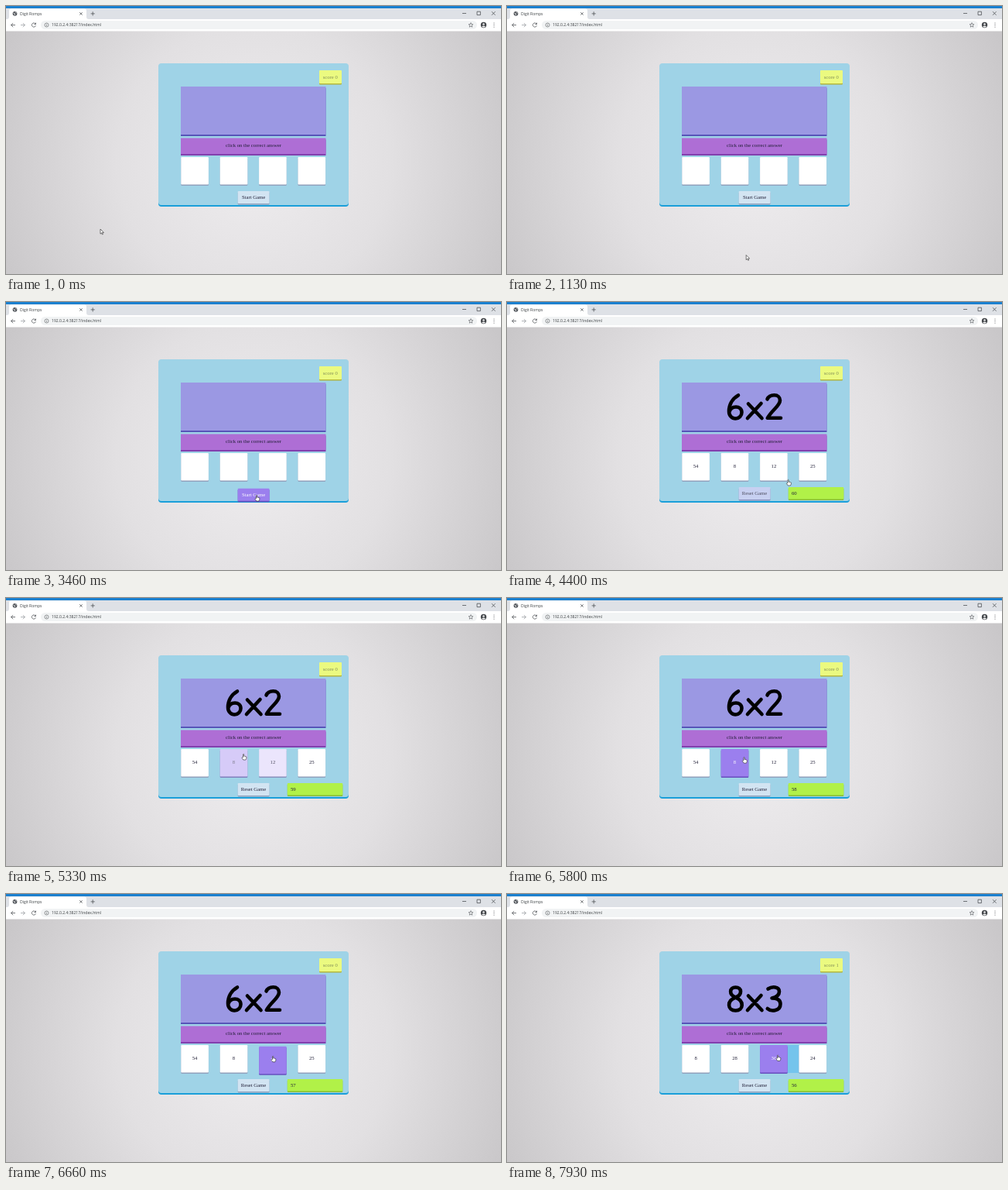
These frames come from a looping animation (640x346 px, 8 s). An HTML page:

```html
<!DOCTYPE html>
<html lang="en">
<head>
<meta charset="utf-8">
<title>Times table quiz</title>
<style>
  html, body { margin: 0; height: 100%; overflow: hidden; }
  svg { display: block; width: 100vw; height: 100vh; }
  text { font: 6.68px "Liberation Serif", Times, serif; fill: #222038; }
  .mid { text-anchor: middle; }
  .ui { font: 5.05px "Open Sans", "Noto Sans", sans-serif; fill: #3c4043; }
  .line { fill: none; stroke: #505357; stroke-width: .8; }
  .sum { fill: none; stroke: #000; stroke-width: 4.6; stroke-linecap: round; stroke-linejoin: round; }
  .pointer { fill: #fff; stroke: #222; stroke-width: .6; stroke-linejoin: round; }
</style>
</head>
<body>
<svg viewBox="0 0 640 346" preserveAspectRatio="none">
  <defs>
    <radialGradient id="page" gradientUnits="userSpaceOnUse" cx="320" cy="200" r="355">
      <stop offset="0" stop-color="#efedef"/>
      <stop offset=".5" stop-color="#e2e0e2"/>
      <stop offset="1" stop-color="#c9c7c9"/>
    </radialGradient>
  </defs>
  <rect width="640" height="346" fill="url(#page)"/>

  <!-- browser window -->
  <rect width="640" height="17" fill="#dee1e6"/>
  <rect width="640" height="3" fill="#1b80cf"/>
  <path d="M1 17Q4 17 4 14V6Q4 3.5 7 3.5H101Q104 3.5 104 6V14Q104 17 107 17Z" fill="#fff"/>
  <rect y="17" width="640" height="15.5" fill="#fff"/>
  <rect x="45" y="19" width="564" height="11" rx="5.5" fill="#f1f3f4"/>
  <circle cx="11.5" cy="9.8" r="2.9" fill="#55595e"/>
  <path d="M9.6 9.2l2 .8l-.6 1.8M12 7.6l1.6 1.4" class="line" style="stroke:#fff"/>
  <text class="ui" x="18" y="11.7">Digit Romps</text>
  <text class="ui" x="59" y="26.4">192.0.2.4:38217/index.html</text>
  <path class="line" d="M95.2 8.2l3.4 3.4m0-3.4l-3.4 3.4M109.6 9.9h5.2m-2.6-2.6v5.2
    M590 9.5h5M609 7.2h4.4v4.4h-4.4zM628 7.2l4.6 4.6m0-4.6l-4.6 4.6
    M12 24.6H6.6m2.6-2.6l-2.6 2.6l2.6 2.6M38.2 23.2a2.6 2.6 0 1 0 .2 2.2M38.5 21.6v2h-2"/>
  <path class="line" style="stroke:#9a9da1" d="M19 24.6h5.4m-2.6-2.6l2.6 2.6l-2.6 2.6"/>
  <g class="line" style="stroke-width:.6">
    <circle cx="52.5" cy="24.5" r="2.5"/>
    <path d="M52.5 24v1.8M52.5 22.8v.5M601 21.6l.8 2l2.1.1l-1.6 1.4l.5 2.1l-1.8-1.2l-1.8 1.2l.5-2.1l-1.6-1.4l2.1-.1z"/>
  </g>
  <circle cx="617.5" cy="24.5" r="3.7" fill="#45484c"/>
  <circle cx="617.5" cy="23.4" r="1.2" fill="#fff"/>
  <path d="M615.2 26.7q2.3-2.4 4.6 0q-2.3 1.7-4.6 0z" fill="#fff"/>
  <path d="M631 22v.01M631 24.5v.01M631 27v.01" stroke="#505357" stroke-width="1.2" stroke-linecap="round"/>

  <g id="game"></g>

  <path class="pointer" id="arrow" d="M0 0V6.2L1.5 4.9L2.5 7L3.4 6.6L2.5 4.5H4.4Z"/>
  <path class="pointer" id="hand" d="M-1.5 .6V-3.2Q-.9-4.2-.3-3.2V-.7Q.5-1.4 .9-.5Q1.7-1 2-.1Q2.9-.4 2.9 .7Q3 2.6 1.9 4H-1.2L-3.1 1.2Q-2.6 .1-1.5 .6Z"/>
</svg>
<script>
const LOOP = 8000, START = 3600, CORRECT = 6700, FADE = 250;
const game = document.getElementById('game');
const $ = id => document.getElementById(id);

// a raised block: its lower edge shows as a darker strip
const block = (x, y, w, h, face, edge, depth = 1.5, r = 1) =>
  `<rect x="${x}" y="${y + depth}" width="${w}" height="${h}" rx="${r}" fill="${edge}"/>
   <rect x="${x}" y="${y}" width="${w}" height="${h}" rx="${r}" fill="${face}" class="face"/>`;
const label = (x, y, s = '') => `<text class="mid" x="${x}" y="${y}">${s}</text>`;
const boxX = i => 226.3 + i * 50.4;

game.innerHTML =
  block(197, 74, 246, 183, '#9fd3e7', '#1b9fd9', 2, 4) +
  block(405, 83, 29, 17, '#ebfa80', '#b6b83c') +
  '<text id="score" x="409.7" y="93.6" style="fill:#85915a"></text>' +
  block(226, 104, 187.5, 62, '#9b98e3', '#5755b8', 2, 0) +
  '<path id="sum" class="sum" role="img"/>' +
  block(226, 170.5, 187.5, 20.5, '#ae6ed5', '#823fae', 2, 0) +
  label(320, 182.3, 'click on the correct answer') +
  '<rect id="selection" x="362" y="195" width="16" height="36" fill="#74c4ec"/>' +
  [0, 1, 2, 3].map(i => `<g id="box${i}">${block(boxX(i), 195, 35.6, 35.5, '#fff', '#8f98b4') +
    label(boxX(i) + 17.8, 214.4)}</g>`).join('') +
  `<g id="button">${block(299.7, 239, 40.8, 16, '#d2e4f2', '#93abc6') + label(320, 249)}</g>` +
  `<g id="timer">${block(363.8, 239, 71.5, 15.5, '#b1f148', '#86bb38')}<text x="368" y="249"></text></g>`;

const glyph = {
  6: 'M299 120.5C291 125 287 133 287 141C287 147 291 150.5 295.5 150.5C300 150.5 303.5 147 303.5 142.5C303.5 138 300 135.5 296 135.5C292 135.5 288.5 138 287.3 142',
  8: 'M295.5 133.5C286.5 130 287.5 120.5 295.5 120.5C304 120.5 304.5 130 295.5 133.5C283.500 138 285 150.500 295.500 150.500C306 150.500 307 138 295.500 133.500',
  x: 'M312 131.500L329.500 150M328.500 131L311 150',
  2: 'M336.500 125.500C338 122 342 120.300 345.500 120.300C350 120.300 353 123 353 127C353 134 343 139 336.800 149.800H354',
  3: 'M337.500 122.500C343 119 352 119.500 352 126C352 131 347 133.500 342.500 134.500C350 134.500 353.500 137.500 353.500 142C353.500 151 342 152.500 336.800 148'
};

// pointer route: time, x, y
const route = [
  [0, 122, 288], [660, 122, 288], [850, 190, 319], [1040, 285, 326], [1200, 328, 318],
  [1780, 328, 318], [2130, 338, 279], [2600, 325, 253], [3900, 325, 253],
  [4200, 340, 244], [4400, 364.5, 233], [4480, 362, 229], [4900, 347, 214],
  [5130, 327, 208], [5230, 312, 206], [5330, 308, 205], [5750, 301, 208],
  [5835, 312, 210], [6060, 341, 212.5], [6900, 348, 213], [7930, 351, 211.500], [LOOP, 351, 211.500]
];

function pointerAt(t) {
  const i = Math.max(1, route.findIndex(p => p[0] > t));
  const [t0, x0, y0] = route[i - 1], [t1, x1, y1] = route[i];
  const k = (t - t0) / (t1 - t0);
  return [x0 + (x1 - x0) * k, y0 + (y1 - y0) * k];
}

const ramp = (t, from) => Math.min(1, Math.max(0, (t - from) / FADE));
const hover = (t, from, to) => ramp(t, from) - ramp(t, to);
const mix = (a, b, k) => `rgb(${a.map((v, i) => Math.round(v + (b[i] - v) * k))})`;
const between = (t, a, b) => t >= a && t < b;
const show = (id, on) => $(id).style.display = on ? '' : 'none';
const write = (node, s) => { if (node.textContent !== s) node.textContent = s; };

function paint(id, base, heat, pressed, s) {
  const g = $(id), text = g.querySelector('text'), face = g.querySelector('.face');
  face.style.fill = mix(base, [155, 127, 238], heat);
  g.firstElementChild.style.fill = mix([143, 160, 188], [103, 79, 190], heat);
  text.style.fill = mix([34, 32, 56], [255, 255, 255], heat);
  g.setAttribute('transform', `translate(0 ${pressed ? 1.8 : 0})`);
  write(text, s);
}

function draw(now) {
  const t = now % LOOP, playing = t >= START, solved = t >= CORRECT;

  const sum = playing ? (solved ? '8x3' : '6x2') : '';
  $('sum').setAttribute('d', [...sum].map(c => glyph[c]).join(''));
  $('sum').setAttribute('aria-label', sum);
  write($('score'), 'score ' + (solved ? 1 : 0));

  const answers = !playing ? ['', '', '', ''] : solved ? [8, 28, 36, 24] : [54, 8, 12, 25];
  const heat = [0, hover(t, 5228, 5835), hover(t, 4480, 5130) + hover(t, 6050, LOOP), 0];
  answers.forEach((a, i) => paint('box' + i, [255, 255, 255], heat[i],
    i === 2 && between(t, CORRECT - 120, CORRECT), String(a)));

  paint('button', [210, 228, 242], hover(t, 2520, 4200), between(t, 3400, START),
    playing ? 'Reset Game' : 'Start Game');
  show('timer', playing);
  write($('timer').lastElementChild, String(60 - Math.max(0, Math.floor((t - START) / 1000))));
  show('selection', solved);

  const onControl = t > 2540;
  show('arrow', !onControl);
  show('hand', onControl);
  $(onControl ? 'hand' : 'arrow').setAttribute('transform', `translate(${pointerAt(t)})`);
}

let origin;
function tick(now) {
  origin ??= now;
  draw(now - origin);
  requestAnimationFrame(tick);
}
draw(0);
requestAnimationFrame(tick);
</script>
</body>
</html>
```
